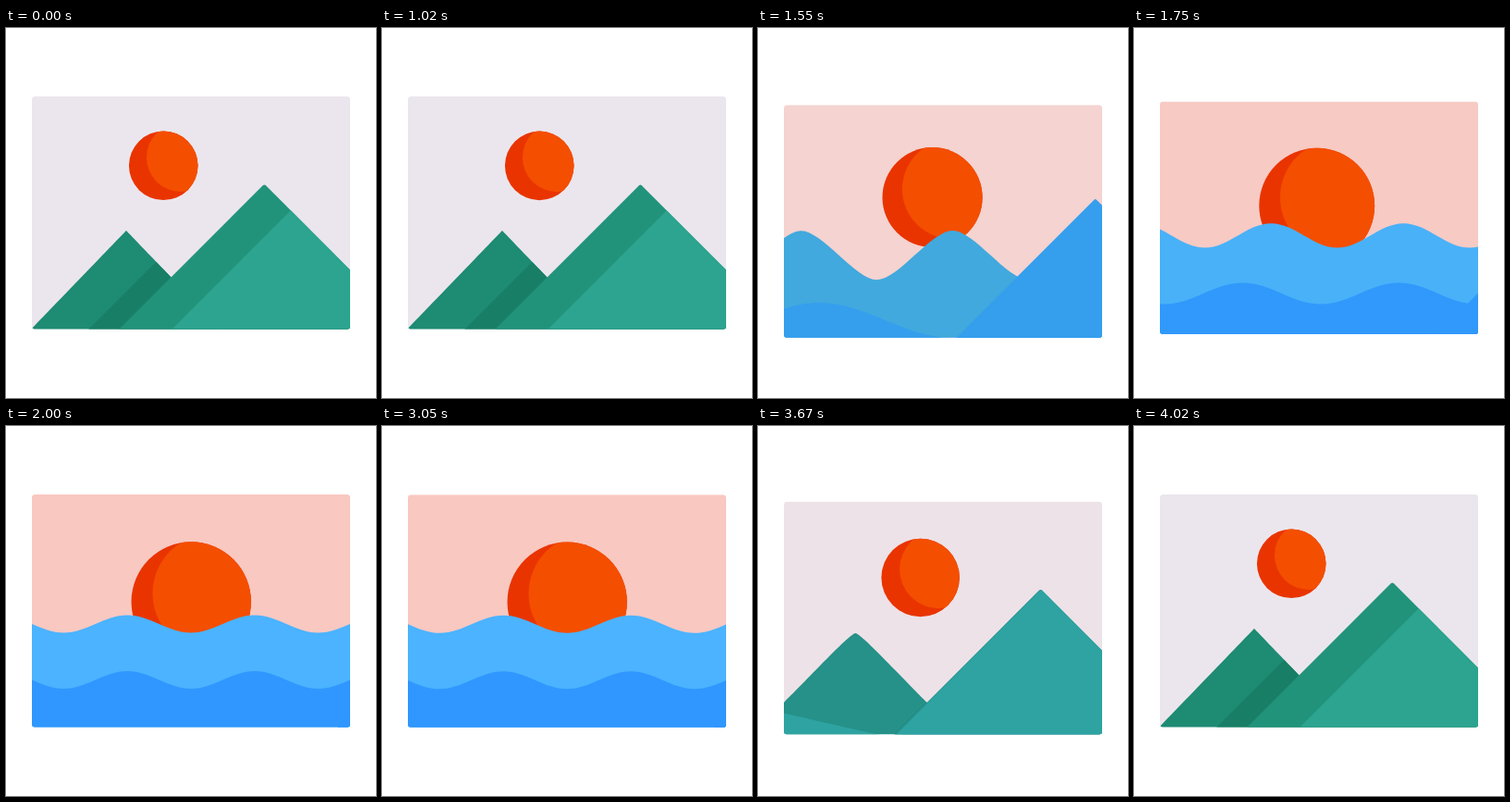
Write an HTML page with a canvas that moves like this. It is 400x400 px and loops after 4050 ms.

```html
<!DOCTYPE html>
<html lang="en">
<head>
<meta charset="utf-8">
<title>Mountains to sea</title>
<style>
  html, body { margin: 0; width: 100%; height: 100%; overflow: hidden; background: #fff; }
  canvas { display: block; width: 100vmin; height: 100vmin; }
</style>
</head>
<body>
<canvas id="stage"></canvas>
<script>
const SIZE = 400, LOOP = 4050, MORPH = 990;
const OUT_START = 1010, BACK_END = 4010;
const PANEL = { x: 28, y: 74, w: 344, h: 251.5, r: 3 };
const BOTTOM = 420;

// Every track lists its values at these points of the morph.
const KEYS = [0, 0.075, 0.607, 1];
const COLORS = {
  sky:   ['#ebe6ed', '#ebe6ed', '#f4d3d0', '#f8c8c1'],
  back:  ['#1e8b73', '#1e8b73', '#41a9dd', '#4bb3ff'],
  shade: ['#187f66', '#187f66', '#41a9dd', '#4bb3ff'],
  edge:  ['#22937b', '#22937b', '#359fee', '#2f97ff'],
  front: ['#2ca48f', '#2ca48f', '#359fee', '#2f97ff']
};
const SUN_DARK = '#e93400', SUN_LIGHT = '#f44e00';

const canvas = document.getElementById('stage');
const ctx = canvas.getContext('2d');

const clamp = v => Math.min(1, Math.max(0, v));
const mix = (a, b, k) => a + (b - a) * k;

// Cubic ease (.6, 0, .4, 1), solved by bisection.
function ease(x) {
  let lo = 0, hi = 1;
  for (let i = 0; i < 24; i++) {
    const s = (lo + hi) / 2, r = 1 - s;
    if (1.8 * r * r * s + 1.2 * r * s * s + s * s * s < x) lo = s; else hi = s;
  }
  return lo * lo * (3 - 2 * lo);
}

function track(p, values, blend = mix) {
  let i = 0;
  while (i < KEYS.length - 2 && p > KEYS[i + 1]) i++;
  return blend(values[i], values[i + 1], (p - KEYS[i]) / (KEYS[i + 1] - KEYS[i]));
}

function mixColor(a, b, k) {
  const part = (hex, i) => parseInt(hex.slice(i, i + 2), 16);
  return `rgb(${[1, 3, 5].map(i => Math.round(mix(part(a, i), part(b, i), k)))})`;
}

function circle(x, y, r) {
  const path = new Path2D();
  path.arc(x, y, r, 0, Math.PI * 2);
  return path;
}

// Peaks at even steps, troughs at odd ones; handle 0 gives straight slopes.
function wave(peakX, half, peakY, troughY, handle) {
  const path = new Path2D(), reach = half * handle;
  const node = i => [peakX + half * i, i % 2 ? troughY : peakY(i)];
  let [x, y] = node(-3);
  path.moveTo(x, BOTTOM);
  path.lineTo(x, y);
  for (let i = -2; i <= 9; i++) {
    const [nx, ny] = node(i);
    path.bezierCurveTo(x + reach, y, nx - reach, ny, nx, ny);
    [x, y] = [nx, ny];
  }
  path.lineTo(x, BOTTOM);
  path.closePath();
  return path;
}

function mountain(x, y) {
  const path = new Path2D(), drop = BOTTOM - y;
  path.moveTo(x - drop, BOTTOM);
  path.arcTo(x, y, x + drop, BOTTOM, 2);
  path.lineTo(x + drop, BOTTOM);
  path.closePath();
  return path;
}

function fill(path, color) {
  ctx.fillStyle = color;
  ctx.fill(path);
}

function clipped(path, draw) {
  ctx.save();
  ctx.clip(path);
  draw();
  ctx.restore();
}

function drawSun(p) {
  const x = mix(170.2, 200.2, p), y = mix(148.8, 190, p), r = mix(37.3, 64.7, p);
  const disc = circle(x, y, r);
  fill(disc, SUN_DARK);
  clipped(disc, () => fill(circle(x + mix(19, 23, p), y - 9, r), SUN_LIGHT));
}

function drawScene(u) {
  const p = ease(u);
  const bands = 1 - ease(clamp(u / 0.4));
  const color = name => track(p, COLORS[name], mixColor);

  const laterPeaks = track(p, [231, 218, 210, 204.5]);
  const back = wave(
    mix(130, -6.4, p), mix(102.5, 68.8, p),
    i => i > 0 ? laterPeaks : mix(219, 204.5, p),
    mix(325.5, 223.5, p), 0.364 * clamp(p * 1.25));

  const crest = track(p, [329, 299, 288, 265]);
  const swell = wave(
    mix(-35, 131.2, p), track(p, [157, 150, 143, 68.8]), () => crest,
    track(p, [331, 328, 326, 284]), 0.364 * clamp(p * 1.6));

  const peakX = track(p, [279.3, 291, 364, 419]);
  const peakY = track(p, [168.7, 167, 174.5, 265]);
  const peak = mountain(peakX, peakY);

  ctx.save();
  ctx.translate(0, 9.3 * Math.pow(Math.sin(Math.PI * u), 1.5));
  const panel = new Path2D();
  panel.roundRect(PANEL.x, PANEL.y, PANEL.w, PANEL.h, PANEL.r);
  clipped(panel, () => {
    fill(panel, color('sky'));
    drawSun(p);
    fill(back, color('back'));
    if (bands > 0.001) {
      clipped(back, () => fill(mountain(peakX - 33 * bands, peakY), color('shade')));
    }
    fill(swell, color('front'));
    fill(peak, color('edge'));
    clipped(peak, () => {
      // Lit face: everything right of the shifted left slope.
      const shift = 57 * bands, drop = BOTTOM - peakY, lit = new Path2D();
      lit.moveTo(peakX + shift - drop, BOTTOM);
      lit.lineTo(peakX + shift + 20, peakY - 20);
      lit.lineTo(peakX + shift + drop + 40, BOTTOM);
      lit.closePath();
      fill(lit, color('front'));
    });
  });
  ctx.restore();
}

function morphAt(t) {
  return clamp(t < 2500 ? (t - OUT_START) / MORPH : (BACK_END - t) / MORPH);
}

function resize() {
  const side = Math.min(innerWidth, innerHeight) * (devicePixelRatio || 1);
  const pixels = Math.max(1, Math.round(side));
  if (canvas.width !== pixels) canvas.width = canvas.height = pixels;
  ctx.setTransform(pixels / SIZE, 0, 0, pixels / SIZE, 0, 0);
}

let start = null;
function frame(now) {
  if (start === null) start = now;
  resize();
  ctx.clearRect(0, 0, SIZE, SIZE);
  drawScene(morphAt((now - start) % LOOP));
  requestAnimationFrame(frame);
}
requestAnimationFrame(frame);
</script>
</body>
</html>
```
